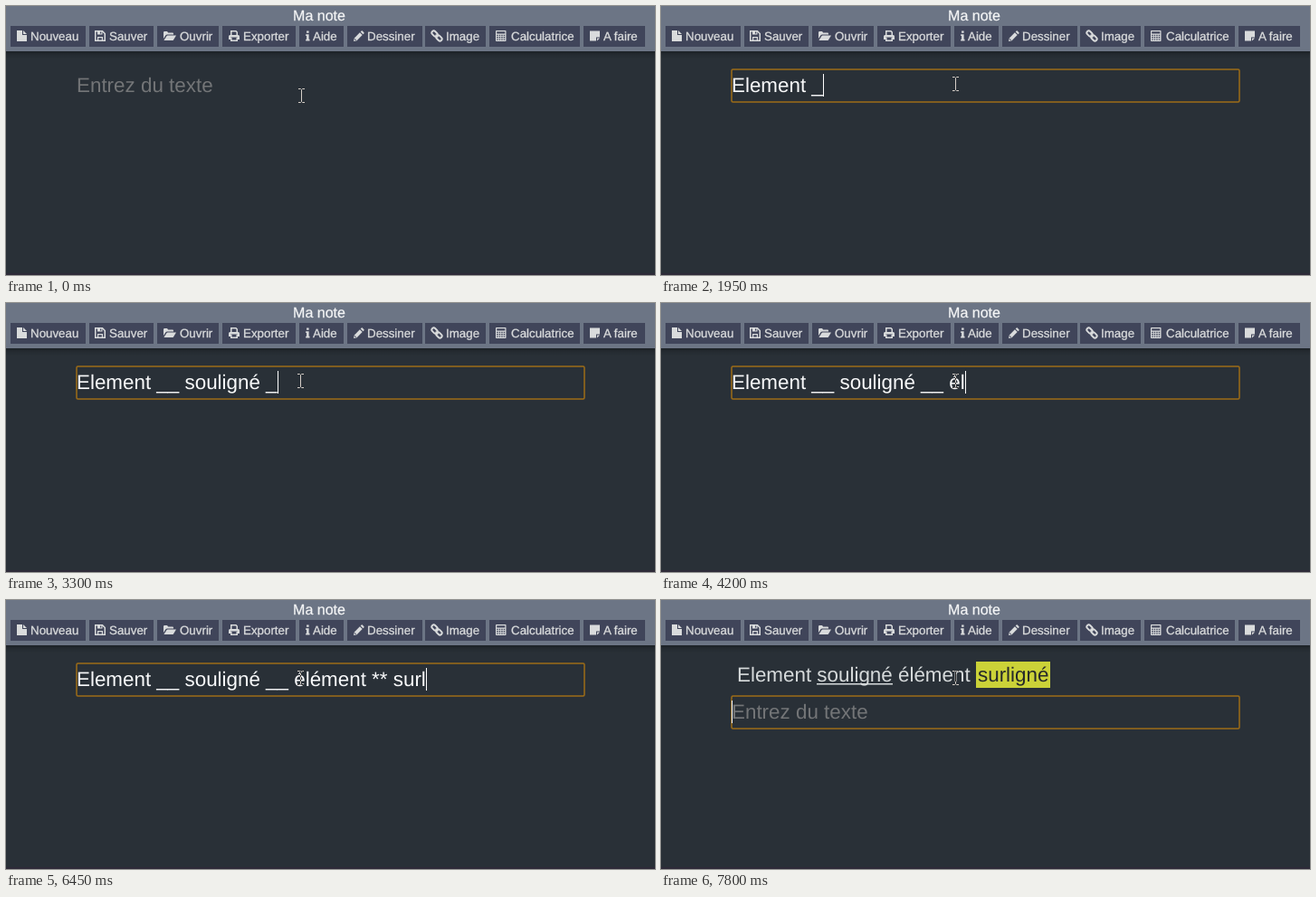
Recreate the animation shown at these times as an HTML page. Size 717 by 297 pixels, loop 8000 ms.

```html
<!DOCTYPE html>
<html lang="fr">
<head>
<meta charset="utf-8">
<title>Ma note</title>
<style>
  html, body { margin: 0; width: 100%; height: 100%; overflow: hidden; background: #293037; }
  svg { display: block; }
  text {
    font-family: "Liberation Sans", Arial, sans-serif;
    text-rendering: geometricPrecision;
    white-space: pre;
  }
  .title { font-size: 16px; fill: #f4f5f6; stroke: #f4f5f6; stroke-width: .25px; }
  .label { font-size: 13.333px; fill: #d9dbdc; stroke: #d9dbdc; stroke-width: .3px; }
  .line { font-size: 22.4px; fill: #f8f9fa; }
  .hint { fill: #737577; }
  .note { fill: #d6dadb; }
  .icon { fill: #d9dbdc; stroke: none; }
  .icon .cut { fill: #40455a; }
  .icon .wire { fill: none; stroke: #d9dbdc; stroke-width: 1.5; }
  #pointer { mix-blend-mode: difference; fill: none; stroke: #fff; stroke-width: 1; }
</style>
</head>
<body>
<svg width="717" height="297" viewBox="0 0 717 297">
  <defs>
    <linearGradient id="shade" x2="0" y2="1">
      <stop offset="0" stop-color="#000" stop-opacity=".32"/>
      <stop offset=".45" stop-color="#000" stop-opacity=".1"/>
      <stop offset="1" stop-color="#000" stop-opacity="0"/>
    </linearGradient>
  </defs>
  <rect width="717" height="297" fill="#293037"/>
  <rect y="295" width="717" height="2" fill="#2e2a38"/>
  <rect y="50" width="717" height="9" fill="url(#shade)"/>
  <rect width="717" height="50" fill="#6c7585"/>
  <text class="title" x="346" y="16" text-anchor="middle">Ma note</text>
  <g id="bar"></g>

  <g id="result">
    <rect x="348" y="68" width="82" height="29" fill="#cbd238"/>
    <text class="line note" x="84" y="90">Element souligné élément </text>
    <rect x="172" y="92" width="84" height="1.5" fill="#d6dadb"/>
    <text class="line" x="350" y="90" style="fill:#25282a">surligné</text>
  </g>

  <g id="field">
    <rect id="ring" x="78" y="70" width="561" height="36" rx="1.5" fill="none" stroke="#9d6c17" stroke-width="1.5"/>
    <text id="hint" class="line hint" x="78" y="95">Entrez du texte</text>
    <text id="typed" class="line" x="78" y="95"></text>
    <rect id="caret" y="75" width="1" height="25" fill="#fff"/>
  </g>

  <path id="pointer" d="M-3.5 .5H-1M1 .5H3.5M-1 .5L0 1.5L1 .5M0 1.5V14.5M-3.5 15.5H-1M1 15.5H3.5M-1 15.5L0 14.5L1 15.5"/>
</svg>
<script>
const $ = id => document.getElementById(id);

// Icon shapes sit in a box whose top is y = 27.
const icons = {
  file: '<path d="M0 0H6V5H11V12H0ZM7 0L11 4H7Z"/>',
  save: '<path class="wire" d="M.75 .75H8.5L11.25 3.5V11.25H.75Z"/><path d="M3 1H8.5V4.5H3ZM3 7H9V11.5H3Z"/><path class="cut" d="M6 1.5H7.3V3.5H6ZM4.2 8.2H7.8V10.5H4.2Z"/>',
  folder: '<path d="M0 9V2.2Q0 1 1.2 1H4L5.2 2.4H10Q11 2.4 11 3.4V4.5H4.2Q3 4.5 2.3 5.6ZM.4 11L3.4 6.2Q3.8 5.5 4.6 5.5H14L11 10.4Q10.6 11 9.8 11Z"/>',
  print: '<path class="wire" d="M2.75 5V.75H8L9.25 2V5"/><path d="M0 6.5Q0 5 1.5 5H10.5Q12 5 12 6.5V10H0Z"/><path class="cut" d="M2.5 7.5H9.5V11H2.5Z"/><path class="wire" d="M2.75 8V11.25H9.25V8"/>',
  info: '<path d="M1.1 .5H3.6V2.8H1.1ZM.2 4.3H3.6V9.8H4.5V11.5H.2V9.8H1.1V6H.2Z"/>',
  pencil: '<path d="M0 12L.8 8.4L6.9 2.3L9.7 5.1L3.6 11.2ZM7.7 1.5L8.7 .5Q9.2 0 9.8 .6L11.4 2.2Q12 2.8 11.5 3.3L10.5 4.3Z"/><path class="cut" d="M1.5 9L3 10.5L2.3 11L1 9.7Z"/>',
  link: '<g transform="rotate(45 6 6)"><rect class="wire" x="-1" y="3.8" width="7" height="4.4" rx="2.1" style="stroke-width:1.9"/><rect class="wire" x="6" y="3.8" width="7" height="4.4" rx="2.1" style="stroke-width:1.9"/><path d="M4 5.2H8V6.8H4Z"/></g>',
  calc: '<rect width="11.5" height="12" rx=".8"/><path class="cut" d="M1.2 1.2H10.3V3.6H1.2Z' +
    [0, 1, 2].map(r => [0, 1, 2, 3].map(c => `M${1.2 + c * 2.5} ${4.8 + r * 2.3}h1.5v1.4h-1.5z`).join('')).join('') + '"/>',
  sticky: '<path d="M0 .5H11V7.5H7V11.5H0ZM8 8.4H11L8 11.4Z"/>'
};

// left, right, icon, icon x, label, label x
const buttons = [
  [5, 88, 'file', 12, 'Nouveau', 27],
  [92, 163, 'save', 98, 'Sauver', 114],
  [167, 235, 'folder', 174, 'Ouvrir', 192],
  [239, 320, 'print', 246, 'Exporter', 262],
  [324, 373, 'info', 331, 'Aide', 339],
  [377, 460, 'pencil', 384, 'Dessiner', 399],
  [463, 530, 'link', 470, 'Image', 486],
  [534, 634, 'calc', 541, 'Calculatrice', 558],
  [638, 706, 'sticky', 645, 'A faire', 660]
];
$('bar').innerHTML = buttons.map(([left, right, icon, ix, label, lx]) =>
  `<rect x="${left}" y="22" width="${right - left}" height="23" fill="#40455a"/>
   <g class="icon" transform="translate(${ix} 27)">${icons[icon]}</g>
   <text class="label" x="${lx}" y="38">${label}</text>`).join('');

const LOOP = 8000, FOCUS = 300, ENTER = 7800;
const message = 'Element __ souligné __ élément ** surligné ** ';

// [start time, characters shown after each 150 ms tick]
const bursts = [
  [600, 1, 2, 3],
  [1200, 4, 6, 8],
  [1950, 9, 11],
  [2400, 12, 14, 15, 17, 18, 19, 21],
  [3450, 22, 23],
  [4050, 24, 25],
  [4500, 26, 27, 28, 30],
  [5250, 31],
  [5850, 32, 34, 35, 36, 38, 40, 42],
  [6900, 43],
  [7200, 44, 46]
];
const keys = bursts.flatMap(([start, ...counts]) => counts.map((n, i) => [start + i * 150, n]));
const blinks = [[3900, 4050], [5550, 5850]];

const show = (id, on) => $(id).setAttribute('visibility', on ? 'visible' : 'hidden');

function draw(t) {
  const done = t >= ENTER;
  const count = done ? 0 : keys.reduce((n, [at, shown]) => t >= at ? shown : n, 0);
  const typed = $('typed');
  const text = message.slice(0, count);
  if (typed.textContent !== text) typed.textContent = text;

  const width = count ? typed.getComputedTextLength() : 0;
  $('caret').setAttribute('x', Math.round(78 + width));
  show('caret', t >= FOCUS && !blinks.some(([a, b]) => t >= a && t < b));
  show('ring', t >= FOCUS);
  show('hint', !count);
  show('result', done);
  $('field').setAttribute('transform', `translate(0 ${done ? 36 : 0})`);
  $('pointer').setAttribute('transform', t < 150 ? 'translate(326.5 91)' : 'translate(325.5 78)');
}

const origin = performance.now();
function tick() {
  draw((performance.now() - origin) % LOOP);
  requestAnimationFrame(tick);
}
tick();
</script>
</body>
</html>
```
